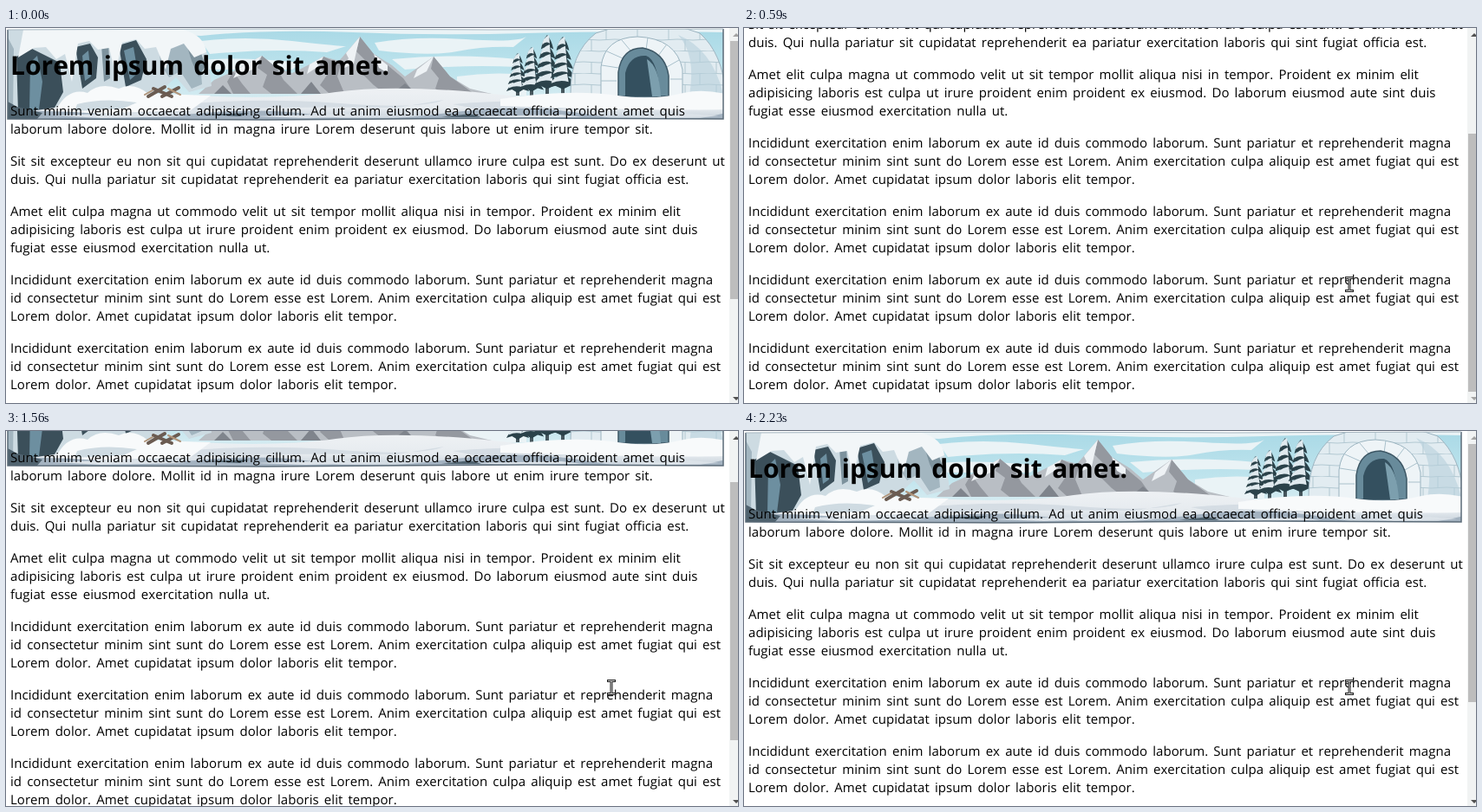
Write an HTML page that moves like this. It is 844x433 px and loops after 2.38 s.

```html
<!DOCTYPE html>
<html lang="la">
<head>
<meta charset="utf-8">
<title>Scrolling page</title>
<style>
  html, body { margin: 0; width: 100%; height: 100%; overflow: hidden; background: #fff; }
  svg { display: block; width: 844px; height: 433px; }
  text {
    font: 15px "Open Sans", "Noto Sans", sans-serif; font-kerning: none;
    letter-spacing: .035px; word-spacing: 2.2px; text-rendering: geometricPrecision; white-space: pre;
  }
  .title { font-size: 30px; font-weight: 700; letter-spacing: 0; word-spacing: 3.6px; }
</style>
</head>
<body>
<svg viewBox="0 0 844 433">
  <defs>
    <clipPath id="frame"><path d="M2 2L300 1L560 2L827 1V105L600 104L300 106L2 105Z"/></clipPath>
    <linearGradient id="sky" x2="0" y2="1">
      <stop stop-color="#a9d9e6"/><stop offset=".5" stop-color="#bfe4ed"/><stop offset="1" stop-color="#e9f2f5"/>
    </linearGradient>
    <linearGradient id="ground" x2="0" y2="1">
      <stop stop-color="#eef1f4"/><stop offset=".6" stop-color="#e6ebef"/><stop offset="1" stop-color="#c3ced8"/>
    </linearGradient>
    <pattern id="bricks" width="36" height="26" patternUnits="userSpaceOnUse">
      <path fill="#e2ecf1" d="M0 0H36V26H0Z"/>
      <path fill="none" stroke="#b2c8d2" d="M0 1Q18 -1 36 1M0 14Q18 12 36 14M8 1V14M27 14V27"/>
    </pattern>
  </defs>

  <g id="page">
    <g clip-path="url(#frame)">
      <path fill="url(#sky)" d="M0 0H830V107H0Z"/>
      <!-- clouds -->
      <g fill="#eaf3f6">
        <path d="M0 0H830V5Q700 3 600 6T400 5T225 9Z"/>
        <path d="M225 15Q275 9 330 15T392 21L370 28Q310 23 235 30Z"/>
        <path d="M425 17Q470 9 530 13T600 10L585 22Q550 21 520 27T430 26Z"/>
        <path d="M445 36Q520 29 590 36V45Q530 42 460 48Z"/>
        <path d="M225 37Q270 33 340 40L330 48H230Z"/>
        <path d="M520 56Q560 50 600 54V78H520Z"/>
      </g>
      <!-- mountains -->
      <path fill="#b9bec4" d="M222 76L240 60L262 50L295 32L312 46L330 52L350 42L366 33L384 38L408 10L424 30L445 43L460 56L493 33L512 56L535 70L560 76Z"/>
      <path fill="#94989f" d="M408 10L404 27L416 39L410 52L424 66L436 75H470L458 58L440 43L424 30ZM493 33L490 47L499 58L495 70L505 76H540L512 56ZM366 33L361 45L371 53L362 66L372 75H390L382 56L386 42ZM295 32L290 46L301 54L296 68L306 76H336L320 60L312 46ZM262 50L255 62L262 76H282L272 64Z"/>
      <path fill="#eef2f5" d="M408 10L392 29L395 35L386 48L401 41L404 27ZM493 33L474 48L470 58L485 50ZM366 33L350 42L347 53L359 45ZM295 32L268 47L262 58L284 48ZM424 30L430 46L440 52L440 43Z"/>
      <path fill="#7f848c" d="M340 76L352 62L363 76ZM445 76L460 64L474 76ZM240 76L250 66L260 76Z"/>
      <!-- snow field -->
      <path fill="url(#ground)" d="M0 82Q90 70 200 77T380 74T570 77T830 74V107H0Z"/>
      <path fill="#d5dde4" d="M205 88Q290 80 385 87T505 83L450 92Q330 90 205 95ZM515 88Q590 81 670 88L640 94L540 93Z"/>
      <!-- ice cave -->
      <path fill="#cddbe2" d="M0 0H190Q226 4 232 30L237 67L211 74L196 57L178 73L0 100Z"/>
      <path fill="#3b4f5a" d="M12 33L30 24L46 32L62 40L66 74L56 92L14 98ZM80 22L97 18L106 34L104 58L88 70ZM130 20L150 14L162 36L156 60L138 68Z"/>
      <path fill="#6d8fa0" d="M28 40L36 32L42 62L38 94L27 95ZM88 32L95 26L98 56L91 61ZM136 26L147 22L152 52L143 60Z"/>
      <path fill="#a3b6c0" d="M176 13L211 17L224 40L226 65L214 70L201 50L188 57L178 42ZM0 7L9 24L8 100H0Z"/>
      <path fill="#7d929d" d="M206 12L222 20L230 44L222 56L214 38ZM110 20L118 16L120 58L113 62Z"/>
      <path fill="#f2f6f8" d="M20 2H205Q229 9 231 28L217 34L205 18L190 24L184 48L173 22L160 24L150 13L134 17L126 52L119 23L106 25L96 15L83 18L76 62L68 30L58 36L46 22L32 23L14 34Z"/>
      <path fill="#f8fafb" d="M58 94Q72 68 94 75Q108 62 130 70Q147 62 164 76L236 78L213 95L61 100Z"/>
      <path fill="#cfdbe2" d="M82 88Q112 80 151 86L135 93L79 96Z"/>
      <!-- camp fire -->
      <g stroke="#6b5c52" stroke-width="4" stroke-linecap="round">
        <path d="M164 79L183 68M170 70L191 79M180 79L199 69"/>
        <path stroke="#b0947a" stroke-width="2" d="M160 77L169 72M187 70L201 77"/>
      </g>
      <g id="trees"></g>
      <!-- igloo -->
      <path fill="url(#bricks)" stroke="#9db4c0" d="M651 77Q650 29 680 6Q742 -16 800 6Q826 29 830 76Q755 86 651 77Z"/>
      <path fill="#b7d0dc" d="M775 8Q814 24 827 76L788 77Q796 31 775 8Z" opacity=".6"/>
      <path fill="#eef4f7" stroke="#9ab3bf" d="M686 79V45Q690 11 728 10Q773 12 780 48V79Z"/>
      <path fill="none" stroke="#a9c0cb" d="M687 43L706 46M693 27L711 35M710 14L720 26M740 11L738 25M761 20L752 32M776 37L762 45M780 59H766M686 61H704"/>
      <path fill="#688b9b" stroke="#3d5765" stroke-width="1.5" d="M706 79V51Q710 23 734 23Q760 28 764 55V79Z"/>
      <path fill="#34505f" d="M714 79V52Q719 31 738 32Q752 37 754 79Z"/>
      <path fill="#7c9fae" d="M739 36Q753 44 755 79H745Z"/>
      <path fill="#f8fafb" d="M570 82Q650 70 705 78Q745 84 781 75Q802 70 830 76V94Q755 96 570 90Z"/>
      <!-- shaded lower edge -->
      <path fill="#a3b2c0" d="M0 97Q55 94 108 99T230 98T360 101T510 98T680 101T830 98V107H0Z"/>
      <path fill="#dce3e9" d="M55 101L142 98L210 102L110 104ZM285 102L390 99L447 102L345 104ZM540 102L640 100L665 103L580 104ZM715 102L790 99L822 102L750 104Z"/>
      <path fill="#50636f" d="M0 84L13 91L42 98L35 106H0ZM228 100L280 98L270 102ZM502 103L535 99L548 103Z"/>
    </g>
    <path fill="none" stroke="#5b6b78" stroke-width="1.5" d="M2 2V105L300 106L600 104L827 105V1"/>
    <path fill="none" stroke="#a5b4be" d="M2 2L300 1L560 2L827 1"/>
    <g id="copy"></g>
  </g>

  <g id="scrollbar">
    <path fill="#f1f3f3" d="M834 0H844V433H834Z"/>
    <rect id="thumb" x="835" width="9" height="298" fill="#bdbdbd"/>
    <path id="up" d="M838 10L842 6L846 10Z"/>
    <path id="down" d="M838 426L842 430L846 426Z"/>
  </g>

  <g id="cursor" fill="none">
    <path stroke="#222" stroke-width="3" d="M-5 -7.5H5M-5 7.5H5M0 -7V7"/>
    <path stroke="#d0d0d0" d="M-4 -7.5H4M-4 7.5H4M0 -7V7"/>
  </g>
</svg>

<script>
const $ = id => document.getElementById(id);
const LOOP = 2380, MAX_SCROLL = 158;

const repeated = [
  "Incididunt exercitation enim laborum ex aute id duis commodo laborum. Sunt pariatur et reprehenderit magna",
  "id consectetur minim sint sunt do Lorem esse est Lorem. Anim exercitation culpa aliquip est amet fugiat qui est",
  "Lorem dolor. Amet cupidatat ipsum dolor laboris elit tempor."
];
const paragraphs = [
  ["Sunt minim veniam occaecat adipisicing cillum. Ad ut anim eiusmod ea occaecat officia proident amet quis",
   "laborum labore dolore. Mollit id in magna irure Lorem deserunt quis labore ut enim irure tempor sit."],
  ["Sit sit excepteur eu non sit qui cupidatat reprehenderit deserunt ullamco irure culpa est sunt. Do ex deserunt ut",
   "duis. Qui nulla pariatur sit cupidatat reprehenderit ea pariatur exercitation laboris qui sint fugiat officia est."],
  ["Amet elit culpa magna ut commodo velit ut sit tempor mollit aliqua nisi in tempor. Proident ex minim elit",
   "adipisicing laboris est culpa ut irure proident enim proident ex eiusmod. Do laborum eiusmod aute sint duis",
   "fugiat esse eiusmod exercitation nulla ut."],
  repeated, repeated, repeated, repeated
];

const line = (text, y, cls = "") => `<text class="${cls}" x="5" y="${y}">${text}</text>`;
let y = 101, copy = line("Lorem ipsum dolor sit amet.", 54, "title");
for (const lines of paragraphs) {
  for (const text of lines) { copy += line(text, y); y += 21; }
  y += 16;
}
$("copy").innerHTML = copy;

// A bushy fir: trunk, drooping dark tiers and a lump of snow on each tier
function fir(x, top, height, width) {
  let art = `<path fill="#46565d" d="M${x - 2} ${top + 10}h4V78h-4z"/>`;
  for (let i = 0; i < 5; i++) {
    const w = width * (.45 + i * .14), ty = top + i * height / 6, h = height / 4;
    art += `<path fill="#2b424a" d="M${x} ${ty}q${w / 3} ${h / 3} ${w / 2} ${h}l${-w / 4} -2l${-w / 4} 4l${-w / 4} -4l${-w / 4} 2q${w / 6} ${-h * .7} ${w / 2} ${-h}z"/>`
         + `<path fill="#dfe9ee" d="M${x + w * .15} ${ty}q${-w / 2} ${h * .2} ${-w * .55} ${h * .7}q${w * .3} ${-h * .3} ${w * .6} ${-h * .1}z"/>`;
  }
  return art;
}
$("trees").innerHTML = [[590, 29, 48, 26], [606, 22, 54, 28], [624, 8, 66, 32], [642, 10, 64, 33]]
  .map(args => fir(...args)).join("");

// [time, scroll offset]
const scrolls = [
  [0, 0],
  [440, 27], [510, 115], [590, MAX_SCROLL],
  [1040, 101], [1120, 11], [1190, 0],
  [1560, 65], [1640, 149], [1710, MAX_SCROLL],
  [2090, 146], [2160, 66], [2230, 0]
];
// [time, x, y]
const pointer = [[0, -50, -50], [140, 740, 359], [210, 706, 314], [290, 698, 296]];
const latest = (steps, t) => steps.findLast(step => step[0] <= t);

function draw(now) {
  const t = now % LOOP;
  const [, scroll] = latest(scrolls, t);
  const [, x, y] = latest(pointer, t);
  $("page").setAttribute("transform", `translate(0 ${-scroll})`);
  $("thumb").setAttribute("y", Math.round(15 + scroll * 107 / MAX_SCROLL));
  $("up").setAttribute("fill", scroll > 0 ? "#505050" : "#a3a3a3");
  $("down").setAttribute("fill", scroll < MAX_SCROLL ? "#505050" : "#a3a3a3");
  $("cursor").setAttribute("transform", `translate(${x} ${y})`);
}

const start = performance.now();
function tick() {
  draw(performance.now() - start);
  requestAnimationFrame(tick);
}
tick();
</script>
</body>
</html>
```
